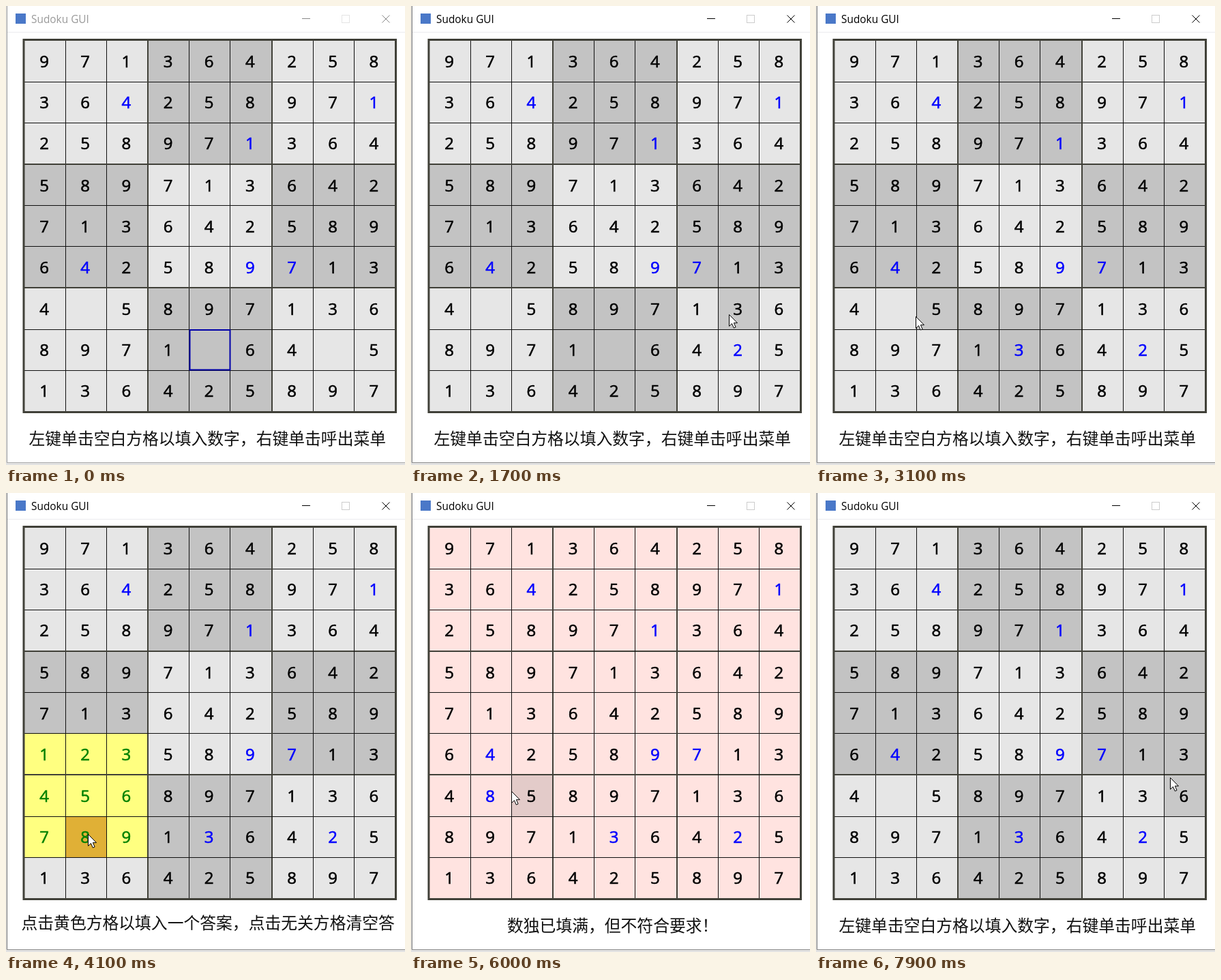
Animation, 585 px wide and 673 px high, one loop 8000 ms. Source, as an HTML page with a canvas:

```html
<!DOCTYPE html>
<html lang="zh-CN">
<head>
<meta charset="utf-8">
<title>Sudoku GUI</title>
<style>
html, body { margin: 0; width: 585px; height: 673px; overflow: hidden; background: #fff; }
canvas { display: block; }
</style>
</head>
<body>
<canvas id="stage" width="585" height="673"></canvas>
<script>
const ctx = document.getElementById('stage').getContext('2d');
const LOOP = 8000, STEP = 100, GLIDE = 600;
const ACTIVE_AT = 500, WRONG_FROM = 4400, WRONG_TO = 6400;
const LATIN = '"Open Sans", "Noto Sans", sans-serif';
const HAN = '23.8px "Noto Sans CJK SC", "Noto Sans CJK", sans-serif';
const FRAME = '#404038', BLUE = '#0000ff';

const SEQUENCE = '971364258';
const FILLED = ['1,2', '1,8', '2,5', '5,1', '5,5', '5,6'];

// Each turn opens the 3x3 picker around a cell and closes it with a value.
const TURNS = [
  { open: 900, close: 1500, r: 7, c: 7, value: '2' },
  { open: 2100, close: 2700, r: 7, c: 4, value: '3' },
  { open: 3500, close: WRONG_FROM, r: 6, c: 1, value: '8' },
  { open: WRONG_TO, close: 7100, r: 6, c: 1, value: '' }
];

// Where the pointer arrives and when; it rests before each glide.
const STOPS = [
  { t: 100, x: 572, y: 134 },
  { t: 300, x: 425, y: 275 },
  { t: 1000, x: 475, y: 494 },
  { t: 1400, x: 479, y: 448 },
  { t: 2200, x: 298, y: 506 },
  { t: 2700, x: 355, y: 447 },
  { t: 3100, x: 146, y: 455 },
  { t: 3300, x: 118, y: 450 },
  { t: 4100, x: 120, y: 500 },
  { t: 4400, x: 120, y: 500 },
  { t: 4700, x: 400, y: 458 },
  { t: 5000, x: 532, y: 448 },
  { t: 6000, x: 147, y: 437 },
  { t: 6200, x: 118, y: 444 },
  { t: 7100, x: 345, y: 386 },
  { t: 7900, x: 519, y: 417 }
];

// Three cells share a block; blocks are spaced a little wider.
const place = (start, i, step) => start + 181.5 * Math.floor(i / 3) + step * (i % 3);
const edgeX = i => Math.round(place(26.5, i, 60.2));
const edgeY = i => Math.round(place(50.4, i, 60.2));
const cellAt = (p, edge) => {
  let i = -1;
  while (i < 9 && p >= edge(i + 1)) i++;
  return i;
};

function pointer(t) {
  const i = STOPS.findIndex(s => t <= s.t);
  if (i === 0) return t < STOPS[0].t ? null : STOPS[0];
  const a = STOPS[i - 1], b = STOPS[i];
  const from = Math.max(a.t, b.t - GLIDE);
  const u = Math.max(0, (t - from) / (b.t - from));
  const k = u * u * (3 - 2 * u);
  return { x: a.x + (b.x - a.x) * k, y: a.y + (b.y - a.y) * k };
}

function digitAt(r, c, t) {
  const turns = TURNS.filter(p => p.r === r && p.c === c);
  if (turns.length) {
    const done = turns.filter(p => t >= p.close).pop();
    return done ? done.value : '';
  }
  return SEQUENCE[(c + 3 * (r % 3) - 2 * Math.floor(r / 3) + 9) % 9];
}

function rect(x, y, w, h, color) {
  ctx.fillStyle = color;
  ctx.fillRect(x, y, w, h);
}

function outline(x, y, w, h, color, width) {
  ctx.strokeStyle = color;
  ctx.lineWidth = width;
  ctx.strokeRect(x, y, w, h);
}

function text(str, x, y, font, color, align = 'left') {
  ctx.font = font;
  ctx.fillStyle = color;
  ctx.textAlign = align;
  ctx.fillText(str, x, y);
}

function drawWindow(active) {
  const ink = active ? '#000' : '#888';
  rect(0, 0, 585, 673, '#fff');
  rect(0, 0, 1, 673, '#e6e6e6');
  rect(1, 0, 1, 670, active ? '#707070' : '#9a9a9a');
  rect(1, 669, 584, 1, active ? '#8c8c8c' : '#aaa');
  rect(0, 670, 585, 3, '#e2e2e2');
  rect(2, 38, 583, 1, '#ebebee');
  rect(14, 11, 15, 15, '#4a78c8');
  text('Sudoku GUI', 37, 24.5, '15.4px ' + LATIN, active ? '#000' : '#999');
  rect(434, 18, 12, 1, ink);
  outline(492.5, 13.5, 11, 11, active ? '#ccc' : '#e4e4e4', 1);
  ctx.strokeStyle = ink;
  ctx.stroke(new Path2D('M551.5 13.5l11 11m0-11l-11 11'));
}

function drawCell(r, c, t, turn, hover) {
  const dark = (Math.floor(r / 3) + Math.floor(c / 3)) % 2;
  let fill = dark ? '#c3c3c3' : '#e6e6e6', over = dark ? '#aaa' : '#c8c8c8';
  let digit = digitAt(r, c, t);
  const answer = FILLED.includes(r + ',' + c) || TURNS.some(p => p.r === r && p.c === c);
  let ink = answer ? BLUE : '#000';

  if (t >= WRONG_FROM && t < WRONG_TO) {
    fill = '#ffe3e0';
    over = '#e3cbc9';
  }
  if (turn && Math.abs(r - turn.r) < 2 && Math.abs(c - turn.c) < 2) {
    fill = '#ffff80';
    over = '#e0b036';
    digit = (r - turn.r + 1) * 3 + c - turn.c + 2;
    ink = '#008000';
  }
  const x = edgeX(c), y = edgeY(r);
  rect(x, y, edgeX(c + 1) - x, edgeY(r + 1) - y, hover ? over : fill);

  const tx = place(56, c, 60.2), ty = Math.round(place(90, r, 60));
  text(digit, tx, ty, '24px ' + LATIN, ink, 'center');
  ctx.strokeStyle = ink;
  ctx.lineWidth = 0.6;
  ctx.strokeText(digit, tx, ty);
}

function drawLines() {
  for (let i = 1; i < 9; i++) {
    const thick = i % 3 === 0;
    const w = thick ? 2 : 1, back = thick ? 1 : 0;
    const color = thick ? FRAME : '#101010';
    rect(edgeX(i) - back, 50, w, 545, color);
    rect(26, edgeY(i) - back, 545, w, color);
  }
  outline(26, 49.5, 545.5, 546, FRAME, 3);
}

function drawHint(t, turn) {
  if (turn) text('点击黄色方格以填入一个答案，点击无关方格清空答', 22.5, 639, HAN, '#111');
  else if (t >= WRONG_FROM && t < WRONG_TO) text('数独已填满，但不符合要求！', 141, 643, HAN, '#111');
  else text('左键单击空白方格以填入数字，右键单击呼出菜单', 33.5, 643, HAN, '#111');
}

const ARROW = new Path2D('M0 0V17L4 13.2L6.8 19.6L9.6 18.4L6.9 12.2H12Z');

function drawArrow(x, y) {
  ctx.save();
  ctx.translate(Math.round(x) + 0.5, Math.round(y) + 0.5);
  ctx.fillStyle = '#fff';
  ctx.fill(ARROW);
  ctx.strokeStyle = '#000';
  ctx.lineWidth = 1;
  ctx.stroke(ARROW);
  ctx.restore();
}

function draw(t) {
  const turn = TURNS.find(p => t >= p.open && t < p.close);
  const at = pointer(t);
  const hoverR = at ? cellAt(at.y, edgeY) : -1;
  const hoverC = at ? cellAt(at.x + 1, edgeX) : -1;
  drawWindow(t >= ACTIVE_AT);
  for (let r = 0; r < 9; r++) {
    for (let c = 0; c < 9; c++) drawCell(r, c, t, turn, r === hoverR && c === hoverC);
  }
  drawLines();
  if (t < ACTIVE_AT) outline(269.5, 475, 59, 58.5, '#0000a8', 2);
  drawHint(t, turn);
  if (at) drawArrow(at.x, at.y);
}

const start = performance.now();
function tick(now) {
  const t = Math.max(0, now - start) % LOOP;
  draw(Math.floor(t / STEP) * STEP);
  requestAnimationFrame(tick);
}
draw(0);
requestAnimationFrame(tick);
</script>
</body>
</html>
```
